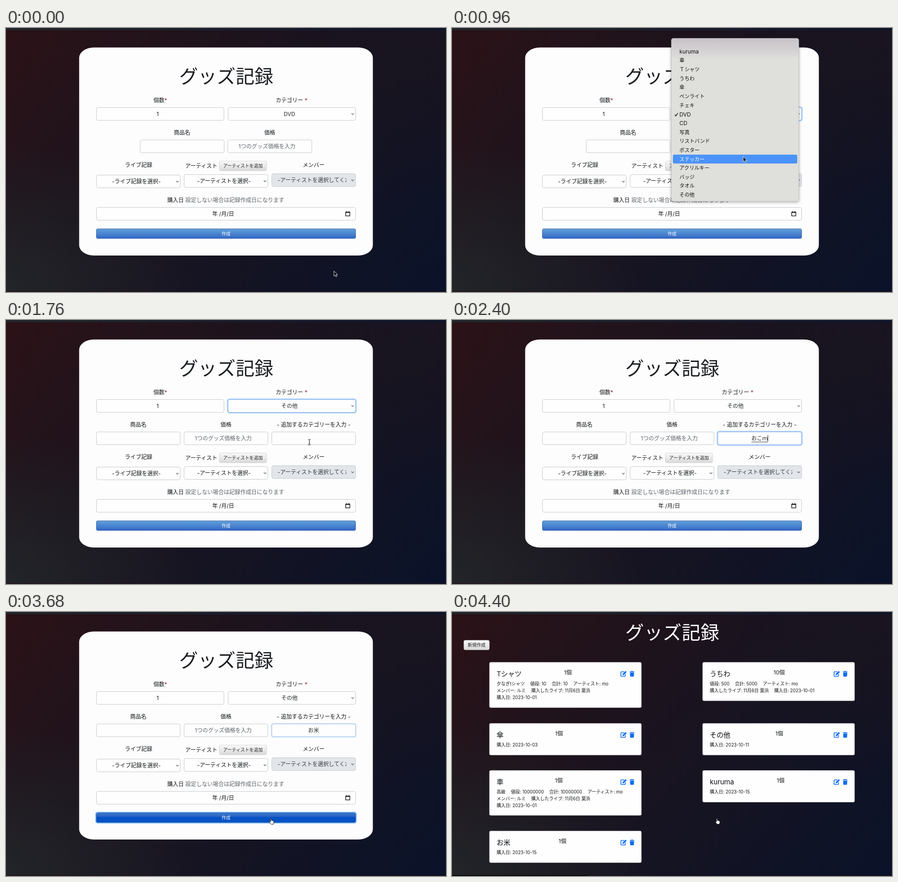
Write an HTML page that moves like this. It is 966 px wide and 579 px high and loops after 4480 ms.

```html
<!DOCTYPE html>
<html lang="ja">
<head>
<meta charset="utf-8">
<title>グッズ記録</title>
<style>
html, body { margin: 0; width: 100%; height: 100%; overflow: hidden; background: #17141f; }
#stage {
  position: relative; width: 966px; height: 579px; overflow: hidden;
  background:
    linear-gradient(90deg, #22262a, #191d2b 55%, #0d152a) 0 0 / 100% 5px no-repeat,
    linear-gradient(90deg, #23161b, #1a1220 50%, #161320) 0 577px / 100% 2px no-repeat,
    radial-gradient(ellipse 420px 330px at 0 100%, #222529, #22252900),
    radial-gradient(ellipse 420px 360px at 100% 0, #19141f, #19141f00),
    linear-gradient(135deg, #2b1217 0%, #1d131d 35%, #161422 62%, #0a1229 100%);
}
svg { position: absolute; inset: 0; }
text { font-family: Inter, "Noto Sans CJK JP", "Noto Sans CJK", sans-serif; white-space: pre; }
</style>
</head>
<body>
<div id="stage"></div>
<script>
const LOOP = 4480, STEP = 80;
const MENU = [520, 1440], EXTRA = 1440, LIST = 4320;
const ITEMS = ['kuruma', '車', 'Ｔシャツ', 'うちわ', '傘', 'ペンライト', 'チェキ', 'DVD', 'CD', '写真',
  'リストバンド', 'ポスター', 'ステッカー', 'アクリルキー', 'バッジ', 'タオル', 'その他'];
const itemY = i => 51.6 + i * 19.65;

// Text is placed by the vertical middle of its glyphs.
const text = (x, y, s, { size = 12, fill = '#111417', anchor = 'middle', more = '' } = {}) =>
  `<text x="${x}" y="${y + size * .37}" font-size="${size}" fill="${fill}" text-anchor="${anchor}" ${more}>${s}</text>`;
const left = (x, y, s, o = {}) => text(x, y, s, { anchor: 'start', ...o });
const rect = (x, y, w, h, r, fill, more = '') =>
  `<rect x="${x}" y="${y}" width="${w}" height="${h}" rx="${r}" fill="${fill}" ${more}/>`;
const box = (x, y, w, fill = '#fefefe') =>
  rect(x + .5, y + .5, w - 1, 28, 3.5, fill, 'stroke="#c3c7cb"');
const arrow = (x, y) =>
  `<path d="M${x - 2.7} ${y - 1.3}l2.7 2.7 2.7-2.7" fill="none" stroke="#565b61" stroke-width="1.1"/>`;
const ring = (id, x, y, w) => `<g fill="none">
  ${rect(x - .8, y - .8, w + 1.6, 30.6, 4.5, 'none', `id="${id}Glow" stroke="#b5d4fb" stroke-width="2.4"`)}
  ${rect(x + .5, y + .5, w - 1, 28, 3.5, 'none', `id="${id}Edge" stroke="#83b2ea"`)}</g>`;
const group = (id, s) => `<g id="${id}">${s}</g>`;
const grad = (id, ...stops) => `<linearGradient id="${id}" x2="0" y2="1">` +
  stops.map(([o, c]) => `<stop offset="${o}" stop-color="${c}"/>`).join('') + '</linearGradient>';
const greyButton = (x, y, w, s) =>
  rect(x, y, w, 21, 3, 'url(#grey)', 'stroke="#c8c8c8" stroke-width=".8"') +
  text(x + w / 2, y + 10.4, s, { size: 9.8, fill: '#222' });
const title = (y, fill) => text(483.5, y, 'グッズ記録', { size: 41.3, fill });

const defs = `<defs>
  ${grad('grey', [0, '#fafafa'], [1, '#d9d9d9'])}
  ${grad('blue', [0, '#62a0da'], [.5, '#4a85cf'], [1, '#3266c6'])}
  ${grad('pressed', [0, '#4379c9'], [.4, '#2562c6'], [.45, '#0452c4'], [1, '#0452c4'])}
  ${grad('sheet', [0, '#c8c3c9'], [.06, '#d2cfd1'], [.13, '#dfdfdb'], [1, '#dfdfdb'])}
  <clipPath id="cut"><rect x="590" y="320" width="157" height="28"/></clipPath>
  <filter id="shade" x="-10%" y="-10%" width="120%" height="120%">
    <feDropShadow dx="0" dy="2" stdDeviation="3" flood-opacity=".3"/></filter>
</defs>`;

const hint = '1つのグッズ価格を入力', grey = { fill: '#5d646b' };
const narrowRow =
  text(386.5, 230, '商品名') + text(579, 230, '価格') +
  box(294, 245, 185.5) + box(486.5, 245, 185.5) + text(573, 259.5, hint, grey);
const wideRow =
  text(290.5, 230, '商品名') + text(483, 230, '価格') + text(675.5, 230, '- 追加するカテゴリーを入力 -') +
  box(198, 245, 185) + box(390.5, 245, 185) + box(583, 245, 185) + text(477, 259.5, hint, grey) +
  ring('extra', 583, 245, 185) +
  `<text id="typed" x="675.3" y="264" font-size="12" fill="#212529" text-anchor="middle"></text>` +
  rect(687, 252.5, 1, 14, 0, '#111', 'id="caret"') + rect(0, 267, 0, 1, 0, '#333', 'id="under"');
const star = '<tspan fill="#8f2029">*</tspan>';

const form =
  rect(160.6, 42.8, 644.8, 456.2, 32.2, '#fdfdfd', 'ry="22.8"') + title(105.5, '#1c1f23') +
  text(338.7, 159, '個数' + star) + text(627, 159, 'カテゴリー ' + star) +
  box(198, 174, 281) + text(333, 188.5, '1') +
  box(487, 174, 281) + ring('cat', 487, 174, 281) +
  `<text id="choice" x="622.3" y="193" font-size="12" fill="#212529" text-anchor="middle"></text>` + arrow(761, 188.5) +
  group('narrow', narrowRow) + group('wide', wideRow) +
  text(291, 301, 'ライブ記録') + left(393.5, 302.5, 'アーティスト') + text(675.5, 301, 'メンバー') +
  greyButton(468.5, 292, 103.5, 'アーティストを追加') +
  box(198, 322, 185) + text(286.3, 336.7, '-ライブ記録を選択-') + arrow(376.3, 336.8) +
  box(390.5, 321, 185) + text(478.5, 335.5, '-アーティストを選択-') + arrow(568.7, 335.8) +
  box(583, 319, 185, '#e2e5ea') +
  left(596.5, 333.7, '-アーティストを選択してください-', { fill: '#343a40', more: 'clip-path="url(#cut)"' }) + arrow(761, 333.8) +
  left(354.3, 378, '購入日') + left(393.8, 378, '設定しない場合は記録作成日になります', { ...grey, size: 12.07 }) +
  box(198, 393, 570) + left(452.7, 408, '年 /月/日') +
  '<path d="M745.8 403.8h9v8.4h-9zM745.3 404.6h10M747.5 401.8v2M753 401.8v2" fill="none" stroke="#000" stroke-width="1.3"/>' +
  rect(197, 439, 572, 24, 4, 'none', 'id="goRing" stroke="#93c6f7" stroke-width="2.2"') +
  rect(198.4, 440.4, 569.2, 21.2, 3, 'url(#blue)', 'id="go" stroke="#2d5a9e" stroke-width=".9"') +
  text(483, 451, '作成', { size: 9.8, fill: '#fff' });

const menu =
  rect(481.5, 22.5, 280, 357.5, 4.5, 'url(#sheet)', 'stroke="#aaa" stroke-width=".6" filter="url(#shade)"') +
  rect(485, 0, 273, 19.6, 3, '#4b93f8', 'id="bar"') +
  ITEMS.map((s, i) => left(499.3, itemY(i), s,
    { size: /^[a-z]+$/i.test(s) ? 12 : 11.1, more: 'class="item"' })).join('') +
  '<path id="tick" d="M489.3 190.2l2.2 2.8 4.2-6.4" fill="none" stroke-width="1.5"/>';

const icons = (x, y) => `<g fill="#0d6cf2" stroke="#0d6cf2">
  <path d="M${x + 8} ${y + 2}h-6.2q-1 0-1 1v8q0 1 1 1h7.8q1 0 1-1v-4" fill="none" stroke-width="1.6"/>
  <path d="M${x + 4.5} ${y + 9.2}l.5-2.7 6-6 2.2 2.2-6 6z" stroke-width=".5"/>
  <path d="M${x + 20.2} ${y + 2}h10M${x + 23.5} ${y + 1}h3.4" stroke-width="1.6"/>
  <path d="M${x + 21} ${y + 4}h8.4l-.6 8.2h-7.2z" stroke-width=".8"/></g>`;
const card = (x, y, h, name, count, countX, ...lines) =>
  rect(x + .2, y + .3, 333.6, h - .6, 3, '#fefefe', 'stroke="#d5d5d8" stroke-width=".6"') +
  left(x + 16, y + 25, name, { size: 15, fill: '#212529', more: 'stroke="#212529" stroke-width=".15"' }) +
  left(countX, y + 22.7, count + '個') + icons(x + 288, y + 19) +
  lines.map((parts, i) => left(x + 16, y + 47.3 + i * 14.8,
    parts.split('|').map((s, k) => `<tspan dx="${k ? 12 : 0}">${s}</tspan>`).join(''), { size: 9.75 })).join('');

const live = '購入したライブ: 11月6日 葉浜';
const member = 'メンバー: ルミ|' + live;
const bought = d => '購入日: 2023-10-' + d;
const list = title(45, '#fff') + greyButton(26, 62, 56, '新規作成') +
  card(82, 110, 100, 'Tシャツ', 1, 246, '夕なぎtシャツ|値段: 10|合計: 10|アーティスト: mo', member, bought('01')) +
  card(82, 244, 70, '傘', 1, 226.5, bought('03')) +
  card(82, 347.3, 99, '車', 1, 226, '高級|値段: 10000000|合計: 10000000|アーティスト: mo', member, bought('01')) +
  card(82, 480, 70, 'お米', 1, 234, bought('15')) +
  card(550, 110, 85, 'うちわ', 10, 706, '値段: 500|合計: 5000|アーティスト: mo', live + '|' + bought('01')) +
  card(550, 244, 70, 'その他', 1, 710, bought('11')) +
  card(550, 347.3, 70, 'kuruma', 1, 713, bought('15'));

const cursors =
  '<path id="point" d="M0 0v11.2l2.6-2.4 1.7 4 2-.9-1.7-3.8h3.6z" fill="#000" stroke="#fff" stroke-width=".9"/>' +
  '<path id="beam" d="M-2.8-6q2.8 0 2.8 1.6V4.4q0 1.6-2.8 1.6M2.8-6Q0-6 0-4.4M0 4.4Q0 6 2.8 6M-1.4 1.8h2.8" fill="none" stroke="#222" stroke-width="1.1"/>' +
  '<path id="hand" d="M1.7 7.2V1q0-1.2 1-1.2t1 1.2v3.4q1.4-.7 1.8.3 1.4-.6 1.8.4 1.7-.4 1.7 1.2v2.5L8 12.6H3.2L-.4 8.3q-.7-1.4.7-1.5z" fill="#fff" stroke="#000" stroke-width=".9"/>';

document.getElementById('stage').innerHTML =
  `<svg width="966" height="579" viewBox="0 0 966 579">${defs}` +
  group('form', form) + group('menu', menu) + group('list', list) +
  rect(0, 577, 298, 2, 0, '#050507', 'id="status"') + group('cursor', cursors) + '</svg>';

const $ = id => document.getElementById(id);
const show = (id, on) => { $(id).style.display = on ? '' : 'none'; };
const fade = (id, v) => { $(id).style.opacity = v; };
const ramp = (t, a, b) => Math.min(1, Math.max(0, (t - a) / (b - a)));
const items = [...document.querySelectorAll('.item')];

// time, x, y of the pointer tip
const PATH = [[80, 720, 533], [440, 697, 187], [640, 697, 187], [1240, 592, 360], [1400, 592, 360],
  [1760, 666, 268], [1920, 668, 262], [2800, 670, 264], [2880, 683, 298], [3520, 579, 453]];
const TYPING = [[2160, 'お'], [2240, 'おｋ'], [2320, 'おこ'], [2400, 'おこｍ'], [2480, 'おこめ'], [2640, 'お米']];

function pointer(t) {
  const i = PATH.findIndex(p => p[0] > t);
  if (i === 0) return PATH[0].slice(1);
  if (i < 0) return PATH.at(-1).slice(1);
  const [t0, x0, y0] = PATH[i - 1], [t1, x1, y1] = PATH[i];
  const u = ramp(t, t0, t1), e = u * u * (3 - 2 * u);
  return [x0 + (x1 - x0) * e, y0 + (y1 - y0) * e];
}

function draw(t) {
  const [x, y] = pointer(t);
  const open = t >= MENU[0] && t < MENU[1], extra = t >= EXTRA, done = t >= LIST;
  show('form', !done);
  show('list', done);
  show('menu', open);
  show('narrow', !extra);
  show('wide', extra);
  show('status', t >= 3760);
  $('choice').textContent = extra ? 'その他' : 'DVD';

  // The chosen row blinks once before the menu closes.
  const hover = t === 1360 ? -1 : Math.round((y + 2 - itemY(0)) / 19.65);
  show('bar', hover >= 0);
  $('bar').setAttribute('y', itemY(hover) - 9.7);
  items.forEach((el, i) => el.setAttribute('fill', i === hover ? '#fff' : '#111'));
  $('tick').setAttribute('stroke', hover === 7 ? '#fff' : '#111');

  const cat = ramp(t, 560, 720) * (1 - ramp(t, 1920, 2080));
  fade('catGlow', cat);
  fade('catEdge', cat);
  const field = ramp(t, 1920, 2080);
  fade('extraGlow', field * (1 - ramp(t, 3600, 3720)));
  fade('extraEdge', field * (1 - ramp(t, 3640, 3800)));

  const word = TYPING.filter(p => p[0] <= t).at(-1)?.[1] ?? '';
  const w = word.length * 12;
  $('typed').textContent = word;
  show('under', word && t < 2800);
  $('under').setAttribute('x', 675.3 - w / 2);
  $('under').setAttribute('width', w);
  show('caret', t >= 1920 && t < 3600);
  $('caret').setAttribute('x', 675.3 + w / 2 - .3);

  const over = y > 440 && t > 2880;
  $('go').setAttribute('fill', over ? 'url(#pressed)' : 'url(#blue)');
  $('go').setAttribute('stroke', over ? '#0a4db4' : '#2d5a9e');
  fade('goRing', t >= 3600 ? 1 : 0);

  const beam = extra && !over && x > 583 && x < 768 && y > 245 && y < 274;
  show('beam', beam);
  show('hand', over);
  show('point', !beam && !over);
  show('cursor', t < 2160 || t >= 2800);
  $('cursor').setAttribute('transform', `translate(${x} ${y})`);
}

function tick() {
  draw(Math.floor(performance.now() % LOOP / STEP) * STEP);
  requestAnimationFrame(tick);
}
tick();
</script>
</body>
</html>
```
